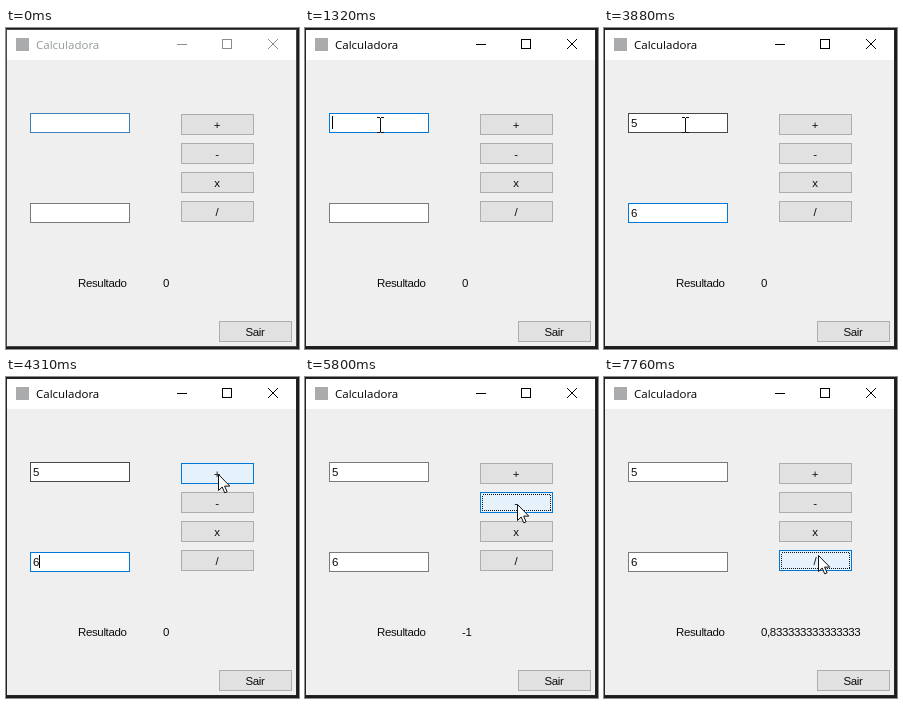
Animation of 293x321 px, one loop 8000 ms. Source, as an HTML page:

```html
<!DOCTYPE html>
<html lang="pt">
<head>
<meta charset="utf-8">
<title>Calculadora</title>
<style>
  html, body { margin: 0; width: 100%; height: 100%; overflow: hidden; background: #1c1c1e; }
  svg { display: block; width: 293px; height: 321px; shape-rendering: crispEdges; }
  text { font: 11.5px "Liberation Sans", Arial, sans-serif; letter-spacing: -.36px; fill: #0c0c0c; }
  .mid { text-anchor: middle; }
  #title { font: 11.5px "Open Sans", "Noto Sans", sans-serif; letter-spacing: 0; }
  #arrow, #spot { shape-rendering: auto; }
</style>
</head>
<body>
<svg id="stage" viewBox="0 0 293 321">
  <rect id="frame" y="1" width="291" height="318"/>
  <rect x="1" y="2" width="289" height="30" fill="#fff"/>
  <rect x="1" y="32" width="289" height="286" fill="#efefef"/>
  <rect x="10" y="10" width="13" height="13" fill="#a9abad"/>
  <text id="title" x="30" y="21">Calculadora</text>
  <g id="controls" fill="none">
    <path d="M171 16.5h10M216.5 11.5h9v9h-9z"/>
    <path d="M262 11l10 10M272 11l-10 10" shape-rendering="auto"/>
  </g>
  <text x="72" y="259">Resultado</text>
  <text id="result" x="157" y="259"></text>
  <g id="widgets"></g>
  <rect id="caret" width="1" height="13"/>
  <circle id="spot" r="11.5" fill="#f4f43c" opacity=".65"/>
  <path id="arrow" d="M.5 .5v16l3.7-3.5 2.5 5.8 2.4-1-2.5-5.7h5.2z" fill="#fff" stroke="#111"/>
  <path id="beam" d="M-3 -7.5h3M1 -7.5h3M.5 -7v14M-3 7.5h3M1 7.5h3" fill="none" stroke="#111"/>
</svg>
<script>
const LOOP = 8000, STEP = 70;
const BLUE = '#0078d7', GREY = '#7a7a7a', FACE = '#e1e1e1', EDGE = '#adadad',
      HOVER = '#e5f1fb', DOWN = '#cce4f7', DEEP = '#005499';
const $ = id => document.getElementById(id);

function add(tag, attrs, text = '') {
  const el = document.createElementNS('http://www.w3.org/2000/svg', tag);
  for (const k in attrs) el.setAttribute(k, attrs[k]);
  el.textContent = text;
  $('widgets').append(el);
  return el;
}

const within = (t, a, b) => t >= a && t < b;
const show = (el, on) => el.style.display = on ? '' : 'none';
const place = (el, x, y) => el.setAttribute('transform', `translate(${x} ${y})`);

// Last value whose time has come
const held = (keys, t) => keys.filter(k => k[0] <= t).pop();

// Colour blended between neighbouring keys
function blend(keys, t) {
  const a = held(keys, t) || keys[0], b = keys.find(k => k[0] > t);
  if (!b || a === b) return a[1];
  return `color-mix(in srgb, ${b[1]} ${(t - a[0]) / (b[0] - a[0]) * 100}%, ${a[1]})`;
}

function makeField(y, digit, typed, keys) {
  const box = add('rect', { x: 24.5, y: y + .5, width: 99, height: 19, fill: '#fff' });
  const text = add('text', { x: 27, y: y + 14 }, digit);
  return t => {
    box.style.stroke = blend(keys, t);
    show(text, t >= typed);
  };
}

function makeButton(x, y, label) {
  const face = add('rect', { fill: FACE, stroke: EDGE });
  const ring = add('rect', { x: x + 2.5, y: y + 2.5, width: 68, height: 16,
    fill: 'none', stroke: '#111', 'stroke-dasharray': '1 1' });
  add('text', { x: x + 36, y: y + 15, class: 'mid' }, label);
  const setEdge = w => {
    const size = { x: x + w / 2, y: y + w / 2, width: 73 - w, height: 21 - w, 'stroke-width': w };
    for (const k in size) face.setAttribute(k, size[k]);
  };
  setEdge(1);
  show(ring, false);
  return { face, ring, setEdge };
}

// Times: pointer enters, presses, releases, leaves; focus lost
function makeKey(y, label, enter, press, up, leave, blur) {
  const { face, ring, setEdge } = makeButton(175, y, label);
  const fill = [[0, FACE], [enter, FACE], [enter + 110, HOVER], [press - 1, HOVER], [press, DOWN],
    [up - 1, DOWN], [up, HOVER], [leave - 1, HOVER], [leave + 60, FACE]];
  const edge = [[0, EDGE], [enter, EDGE], [enter + 110, BLUE], [press - 1, BLUE], [press, DEEP],
    [up - 1, DEEP], [up, BLUE], [blur - 1, BLUE], [blur, EDGE]];
  const update = t => {
    const focus = within(t, press, blur);
    face.style.fill = blend(fill, t);
    face.style.stroke = blend(edge, t);
    setEdge(focus && t >= leave ? 2 : 1);
    show(ring, focus);
  };
  return { update, press, up };
}

const fields = [
  makeField(85, '5', 1910, [[0, '#3f7fb5'], [140, GREY], [700, GREY], [840, '#171717'],
    [910, '#171717'], [1120, BLUE], [2710, BLUE], [2850, '#143f6b'], [2990, '#484848'],
    [4650, '#484848'], [4930, GREY]]),
  makeField(175, '6', 3210, [[0, GREY], [2710, GREY], [2850, '#1a78bf'], [2990, BLUE],
    [4650, BLUE], [4930, GREY]])
];
const keys = [
  makeKey(86, '+', 4170, 4650, 4790, 5190, 5730),
  makeKey(115, '-', 5330, 5730, 5800, 6130, 6670),
  makeKey(144, 'x', 6330, 6670, 6740, 7210, 7690),
  makeKey(173, '/', 7350, 7690, 7760, LOOP, LOOP)
];
makeButton(213, 293, 'Sair');

const results = [[0, '0'], [4790, 5 + 6], [5800, 5 - 6], [6740, 5 * 6],
  [7760, (5 / 6).toFixed(15).replace('.', ',')]];
const carets = [[0], [910, 27, 88], [1910, 33, 88], [2440], [2710, 27, 178],
  [3210, 33, 178], [3760], [4310, 33, 178], [4650]];
const stops = [[4310, 212, 97], [5190, 212, 107], [5260, 212, 108], [5330, 212, 118],
  [5400, 212, 127], [6130, 212, 138], [6330, 212, 146], [6400, 212, 152], [6470, 212, 157],
  [7140, 212, 160], [7210, 213, 166], [7280, 213, 171], [7350, 214, 174], [7420, 214, 177],
  [7490, 214, 178]];

function pointer(t) {
  if (t < 70 || within(t, 1910, 3760)) return null;
  const part = (start, n) => Math.min(1, Math.floor((t - start + 10) / STEP) / n);
  if (t < 1910) {
    const p = 1 - (1 - part(70, 11)) ** 1.6;
    return [226 - 151 * p, 281 - 184 * p].map(Math.round);
  }
  if (t < 4310) {
    const p = part(3760, 8);
    return [Math.round(75 + 137 * p * p * (3 - 2 * p)), 97];
  }
  return held(stops, t).slice(1);
}

function draw(t) {
  const active = t >= 910;
  $('frame').style.fill = active ? '#252527' : '#4a4a4c';
  $('title').style.fill = active ? '#000' : '#929a98';
  $('controls').style.stroke = active ? '#000' : '#8c8c8c';
  fields.forEach(f => f(t));
  keys.forEach(k => k.update(t));
  $('result').textContent = held(results, t)[1];

  const [, cx, cy] = held(carets, t);
  show($('caret'), cx);
  if (cx) place($('caret'), cx, cy);

  const at = pointer(t);
  const inField = at && at[0] < 124 && at[1] < 105;
  show($('arrow'), at && !inField);
  show($('beam'), inField);
  show($('spot'), within(t, 910, 1120) || keys.some(k => within(t, k.press, k.up)));
  if (at) {
    place($('arrow'), ...at);
    place($('beam'), ...at);
    place($('spot'), ...at);
  }
}

function tick() {
  draw(performance.now() % LOOP);
  requestAnimationFrame(tick);
}
tick();
</script>
</body>
</html>
```
